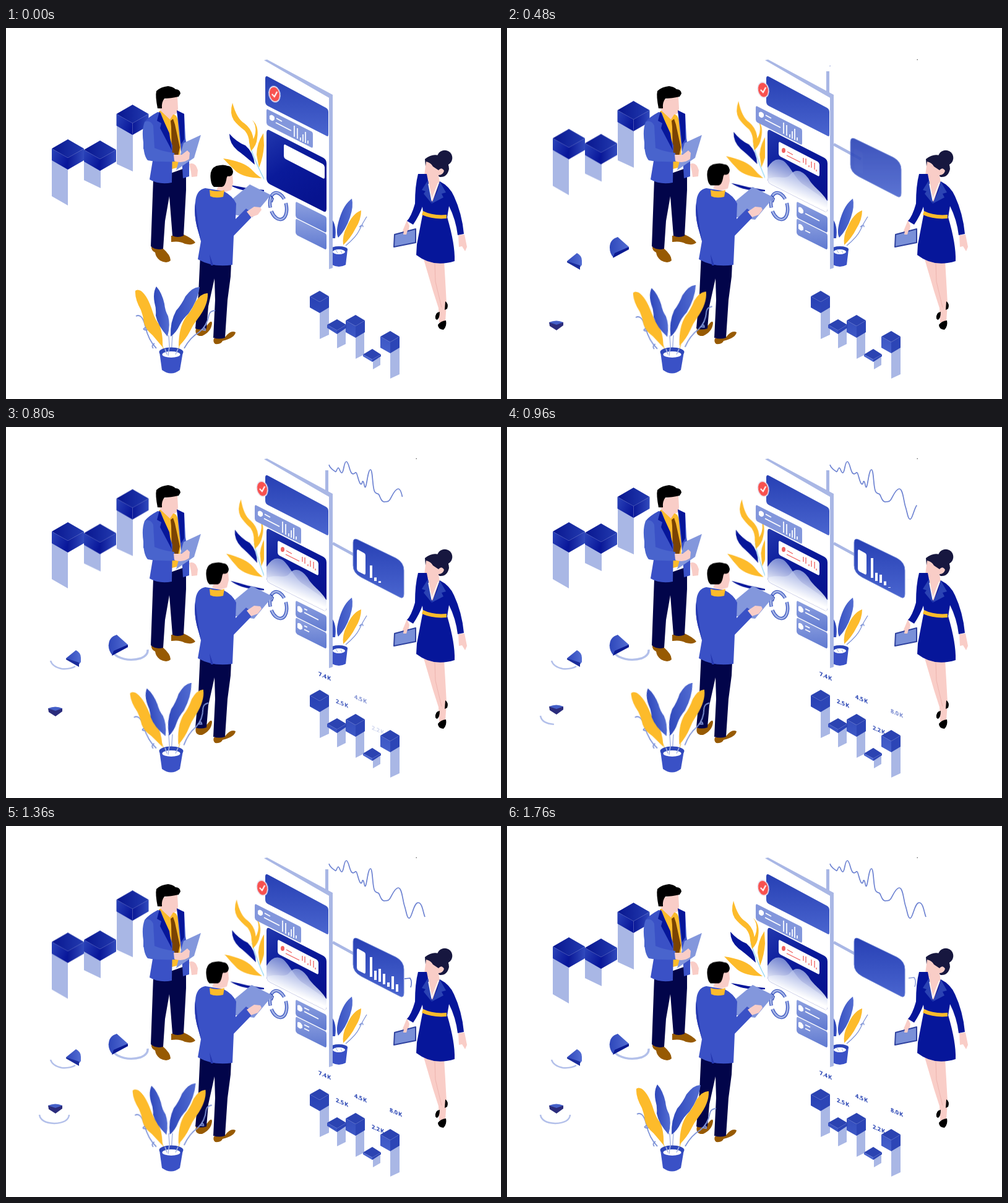
Animation of 800x600 px, one loop 1840 ms. Source, as an HTML page without scripts:

```html
<!DOCTYPE html>
<html lang="en">
<head>
<meta charset="utf-8">
<title>Isometric team dashboard</title>
<style>
html,body{margin:0;width:100%;height:100%;overflow:hidden;background:#fff}
svg{display:block;width:100%;height:100%}
.a{animation:1.84s linear infinite}
.blue{fill:#3a51c6}.navy{fill:#06169a}.night{fill:#02054a}.gold{fill:#fdbb2b}
.skin{fill:#f9cdc7}.pale{fill:#a9b7e5}.mid{fill:#8397dc}.shoe{fill:#975a02}
.w{fill:none;stroke:#fff;stroke-width:1.7}
.r{fill:none;stroke:#f0605f;stroke-width:1.3}
.vine{fill:none;stroke:#7f94d8;stroke-width:1.8}
.arc{fill:none;stroke:#b3c0ea;stroke-width:3.4;stroke-dasharray:1 2}
.label{font:bold 9.2px "Open Sans","Noto Sans",sans-serif;word-spacing:-1.5px;fill:#2440b2}
.draw{stroke-dasharray:1 2}

/* bobbing cubes */
.c1{animation-name:c1}.c2{animation-name:c2}.c3{animation-name:c3}
.c1,.c2,.c3{animation-timing-function:ease-in-out}
@keyframes c1{0%,4.3%{transform:none}41.7%,52.2%{transform:translateY(-26px)}87%,100%{transform:none}}
@keyframes c2{0%,8.7%{transform:none}47.8%,56.5%{transform:translateY(-26px)}91.3%,100%{transform:none}}
@keyframes c3{0%,13%{transform:none}52.2%,63%{transform:translateY(-26px)}95.6%,100%{transform:none}}

/* swaying leaves */
.sway{animation-name:sway;transform-origin:266px 520px}
.bush{animation-name:sway;transform-origin:417px 262px}
@keyframes sway{0%,95.65%,100%{transform:none}47.8%{transform:rotate(var(--d))}}

/* panel */
.row{animation-name:row}
@keyframes row{0%{transform:none}13.04%{transform:translate(-16px,-4px)}21.7%,100%{transform:translate(-19px,-5px)}}
.badge{animation-name:badge}
@keyframes badge{0%{transform:none}13.04%{transform:translate(-16px,-5px)}21.7%,100%{transform:translate(-20px,-7px)}}
.slot{animation-name:slot}
@keyframes slot{0%,6%{transform:none}13.04%{transform:translate(-3.5px,-1.5px)}26.08%,100%{transform:translate(-10px,-4px)}}
.hills{animation-name:hills;transform-origin:421px 250px}
@keyframes hills{0%{transform:scaleX(.4);opacity:0}4.3%{opacity:0}13.04%{transform:scaleX(.86);opacity:1}21.7%,100%{transform:none;opacity:1}}
.in1{animation-name:in1}.in2{animation-name:in2}.in3{animation-name:in3}
@keyframes in1{0%,4.3%{opacity:0}13%,100%{opacity:1}}
@keyframes in2{0%,14%{opacity:0}25%,100%{opacity:1}}
@keyframes in3{0%,26%{opacity:0}34%,78%{opacity:1}91%,100%{opacity:0}}
.d1{animation-name:d1}.d2{animation-name:d2}.d3{animation-name:d3}.d4{animation-name:d4}.d5{animation-name:d5}
@keyframes d1{0%,8.7%{stroke-dashoffset:1}17.4%,100%{stroke-dashoffset:0}}
@keyframes d2{0%,15%{stroke-dashoffset:1}26%,100%{stroke-dashoffset:0}}
@keyframes d3{0%,26.1%{stroke-dashoffset:1}43.47%{stroke-dashoffset:.27}56.5%,100%{stroke-dashoffset:0}}
@keyframes d4{0%,28%{stroke-dashoffset:1}43%,100%{stroke-dashoffset:0}}
@keyframes d5{0%,45%{stroke-dashoffset:1}60.5%,100%{stroke-dashoffset:0}}

/* card, pies, head */
.card{animation-name:card}
@keyframes card{0%,20%{opacity:0;transform:translate(-12px,-6px)}26.08%{opacity:.9;transform:translate(-6px,-3px)}34.8%,100%{opacity:1;transform:none}}
.hook{animation-name:hook}
@keyframes hook{0%,52%{opacity:0;transform:none}60%,82%{opacity:1;transform:none}95.6%,100%{opacity:.7;transform:translate(5px,-1px)}}
.dot{animation-name:dot}
@keyframes dot{0%,24%{opacity:0}24.1%,100%{opacity:1}}
.p1{animation-name:p1}.p2{animation-name:p2}.p3{animation-name:p3}
@keyframes p1{0%,3%{opacity:0;transform:translateY(30px)}8%{opacity:1}13.04%{transform:translateY(18px)}26.08%{transform:translateY(2px)}34.8%,100%{opacity:1;transform:none}}
@keyframes p2{0%,7%{opacity:0;transform:translateY(50px)}12%{opacity:1}13.04%{transform:translateY(37px)}26.08%{transform:translateY(3px)}34.8%,100%{opacity:1;transform:none}}
@keyframes p3{0%,18%{opacity:0;transform:translateY(36px)}24%{opacity:1}26.08%{transform:translateY(24px)}43.47%{transform:translateY(3px)}52%,100%{opacity:1;transform:none}}
.head{animation-name:head}
@keyframes head{0%{transform:none}13.04%{transform:translate(-3px,-1px)}26.08%,100%{transform:translate(-7px,-2.5px)}}
.pad{animation-name:pad}
@keyframes pad{0%{transform:none}13.04%{transform:translate(1.5px,2px)}26.08%,100%{transform:translate(3px,4px)}}
</style>
</head>
<body>
<svg viewBox="0 0 800 600">
<defs>
  <linearGradient id="top"><stop stop-color="#08168f"/><stop offset="1" stop-color="#233bb0"/></linearGradient>
  <linearGradient id="left" x2="1" y2=".6"><stop stop-color="#2c45ba"/><stop offset="1" stop-color="#08169a"/></linearGradient>
  <linearGradient id="right"><stop stop-color="#0a1897"/><stop offset="1" stop-color="#324bbd"/></linearGradient>
  <linearGradient id="pane" x2="0" y2="1"><stop stop-color="#2740b4"/><stop offset="1" stop-color="#4a65cf"/></linearGradient>
  <linearGradient id="deep" x2=".5" y2="1"><stop stop-color="#2238ae"/><stop offset=".5" stop-color="#0a1a9a"/><stop offset="1" stop-color="#07138f"/></linearGradient>
  <linearGradient id="soft" x2="0" y2="1"><stop stop-color="#8ea1e0"/><stop offset="1" stop-color="#5f79d0"/></linearGradient>
  <linearGradient id="leaf"><stop stop-color="#2e47bb"/><stop offset="1" stop-color="#536dd2"/></linearGradient>
  <linearGradient id="haze" gradientUnits="userSpaceOnUse" x1="470" y1="222" x2="452" y2="266"><stop stop-color="#8fa1df" stop-opacity=".75"/><stop offset="1" stop-color="#fff"/></linearGradient>
  <clipPath id="screen"><path id="main" d="M421 170Q421 162 427 166L513 210Q518 213 518 219V292Q518 300 512 296L427 253Q421 250 421 243Z"/></clipPath>
  <clipPath id="edge"><path d="M340 100H417.5V280H340Z"/></clipPath>
  <g id="block">
    <path d="M0 0L26 15 0 30-26 15Z" fill="url(#top)"/>
    <path d="M-26 15L0 30V49L-26 34Z" fill="url(#left)"/>
    <path d="M26 15L0 30V49L26 34Z" fill="url(#right)"/>
  </g>
  <g id="lines">
    <path d="M471 290Q475 288 479 295V299Q475 302 471 297Z" fill="#fff"/>
    <path class="w a draw d1" pathLength="1" d="M482 294L490 298"/>
  </g>
  <path id="tag" d="M468 284Q468 280 471 282L515 304Q518 305 518 309V327Q518 332 515 330L471 308Q468 306 468 303Z"/>
</defs>

<!-- bobbing cubes -->
<g class="a c1"><path class="pale" d="M74 212L100 226V287L74 272Z"/><use href="#block" x="100" y="180"/></g>
<g class="a c2"><path class="pale" d="M126 213L153 228V259L126 246Z"/><use href="#block" x="152" y="182"/></g>
<g class="a c3"><path class="pale" d="M179 156L205 170V232L179 220Z"/><use href="#block" x="204.500" y="124"/></g>

<!-- pies -->
<path class="arc a d4" pathLength="1" d="M167 352Q166 362 180 371Q198 380 218 374Q230 369 229 360"/>
<path class="arc a d4" style="stroke-width:2.5" pathLength="1" d="M72 378Q75 388 90 391Q104 392 112 387"/>
<path class="arc a d5" style="stroke-width:2.5" pathLength="1" d="M54 467Q56 480 78 481Q101 480 102 467"/>
<g class="a p1"><path fill="url(#leaf)" d="M197 352L179 336Q166 340 166 353Q166 363 172 369Z"/><path fill="#0b1a92" d="M197 352L174 362 171 370 197 356Z"/></g>
<g class="a p2"><path fill="url(#leaf)" d="M97 374L113 361Q121 365 121 373V380L118 384Z"/><path fill="#1a2c9c" d="M97 374L118 381V388L97 376Z"/></g>
<g class="a p3"><path fill="#2b2c7c" d="M68 452H91V457L80 465 69 458Z"/><path fill="#4560c8" d="M68 452Q80 447 91 452L80 456Z"/></g>

<!-- plant beside the panel -->
<g clip-path="url(#edge)"><g class="a bush" style="--d:6deg">
  <path d="M394 190Q404 220 419 248" fill="none" stroke="#94d7f3" stroke-width="1.300"/>
  <path class="gold" d="M366 121Q361 138 368 149Q374 157 386 166Q393 175 393 185L396 199Q402 186 399 175Q396 162 385 154Q373 147 366 121ZM398 149Q405 157 403 170Q401 180 395 187L396 199Q405 190 406 178Q409 158 398 149ZM416 170Q405 187 405 205L409 226Q416 208 417 190ZM351 211Q361 222 372 232Q384 242 413 243Q403 236 396 228Q384 216 351 211Z"/>
  <path class="navy" d="M361 171Q361 187 374 198Q384 205 402 221Q400 201 387 190Q372 184 361 171ZM362 254Q376 256 390 259L418 262V264Q380 266 362 254Z"/>
</g></g>

<!-- plant behind the panel -->
<path fill="url(#leaf)" d="M559 276Q546 285 539 308Q532 330 537 339Q549 327 556 306Q562 288 559 276ZM526 308Q535 320 532 340H526Z"/>
<path class="gold" d="M574 295Q560 300 551 321Q543 336 545 351Q557 340 565 324Q574 310 574 295Z"/>
<path class="vine" style="stroke-width:1.300" d="M549 352Q566 338 571 327T583 305M571 322Q577 316 577 322"/>
<path class="blue" d="M523 358L527 383Q538 389 549 383L552 358Z"/><ellipse cx="538" cy="358" rx="14" ry="5" fill="#2c45b8"/><ellipse cx="538" cy="362" rx="10" ry="4" fill="#fff"/>
<path d="M533 359L536 364M541 360L543 364" stroke="#9fb0e4"/>

<!-- panel -->
<path class="pale" d="M417 52L422 51 528 108V388L522 390V113Z"/><path fill="#fff" d="M417 55L522 113V390H417Z"/>
<path d="M518.500 107V70" class="a draw d2" pathLength="1" stroke="#a9b7e5" stroke-width="5"/>
<path d="M528 188L572 212" class="a draw d2" pathLength="1" stroke="#a9b7e5" stroke-width="4.500"/>
<path fill="url(#pane)" d="M419 82Q419 76 424 79L517 129Q521 131 521 136V172Q521 177 517 174L423 126Q419 124 419 119Z"/>
<use href="#main" fill="url(#deep)"/>
<g clip-path="url(#screen)"><g class="a hills" fill="url(#haze)">
  <path d="M421 226Q432 208 445 214C457 220 466 246 482 255L518 280V300H421Z"/>
  <path d="M421 244C440 237 450 247 458 237C467 226 478 231 487 243C496 259 506 261 518 280V300H421Z"/>
</g></g>
<g class="a slot">
  <path fill="#fff" d="M449 191Q449 187 452 189L512 220Q515 222 515 225V241Q515 245 512 243L452 212Q449 210 449 207Z"/>
  <g class="a in2">
    <ellipse cx="457" cy="202" rx="3" ry="4" fill="#f0605f"/>
    <path class="r" d="M463 204L472 209M462 210L484 221M489 222V214M493 225V215M498 229V226M502 230V220M507 233V222M510 236V233"/>
  </g>
</g>
<g class="a row">
  <path class="mid" d="M421 134Q421 130 424 132L493 167Q496 168 496 172V191Q496 195 493 193L424 158Q421 156 421 153Z"/>
  <path fill="#fff" d="M426 142Q430 138 434 144V148Q430 153 426 147Z"/>
  <path class="w" d="M437 146L446 151M436 153L461 166M466 176V158M471 179V162M476 182V177M480 184V172M484 186V168M488 187V182"/>
</g>
<g class="a badge"><g transform="translate(434 107) rotate(-12)">
  <ellipse rx="9.500" ry="13.500" fill="#e9ecfa"/><ellipse rx="8" ry="11.500" fill="#f8514f"/><path class="w" style="stroke-width:2" d="M-4-1L-1 4 5-3"/>
</g></g>
<use href="#tag" fill="url(#soft)"/><use href="#tag" y="27.500" fill="url(#soft)"/>
<g class="a in1"><use href="#lines"/><use href="#lines" y="27.500"/>
  <path class="w a draw d1" pathLength="1" d="M482 300L505 312"/>
  <path class="w a draw d1" pathLength="1" d="M482 327.500L490 331.500"/>
</g>
<g fill="none" stroke-dasharray="50 6 46 7" transform="rotate(-13 440 288)">
  <ellipse cx="440" cy="288" rx="13" ry="22" stroke="#3550bd" stroke-width="5.400"/>
  <ellipse cx="440" cy="288" rx="13" ry="22" stroke="#a3b3e6" stroke-width="3"/>
</g>
<path d="M428 271L432 276 430 282" fill="none" stroke="#2440b0" stroke-width="1.500"/>

<!-- line chart -->
<path class="a draw d3" pathLength="1" fill="none" stroke="#6f84d2" stroke-width="1.700" d="M522 61C524 68 530 70 532 72S535 66 537 66S540 75 543 74S546 56 550 56S555 72 559 75S564 72 566 74S570 90 573 92S575 87 577 88S579 99 581 97S585 69 589 69S592 100 596 105S601 106 603 110S607 122 612 121S617 122 620 118S628 100 634 100S641 120 644 129S648 150 652 149S659 124 666 124S674 140 677 147"/>
<path class="a dot" d="M662.500 50.500H664V52H662.500Z" fill="#777"/>

<!-- card -->
<g class="a card">
  <path fill="url(#pane)" stroke="#7288d6" d="M561 187Q561 179 568 182L630 212Q643 219 643 232V270Q643 279 636 275L574 243Q561 236 561 224Z"/>
  <g class="a in3">
    <path fill="#fff" d="M567 201Q567 197 570 199L579 204Q581 205 581 208V236Q581 240 578 238L570 234Q567 232 567 229Z"/>
    <g class="w draw" style="stroke-width:4">
      <path pathLength="1" d="M590 244V212"><animate attributeName="stroke-dashoffset" values="1;1;0;0" keyTimes="0;.326;.5;1" dur="1.840s" repeatCount="indefinite"/></path>
      <path pathLength="1" d="M597 249V234"><animate attributeName="stroke-dashoffset" values="1;1;0;0" keyTimes="0;.37;.543;1" dur="1.840s" repeatCount="indefinite"/></path>
      <path pathLength="1" d="M604 252V231"><animate attributeName="stroke-dashoffset" values="1;1;0;0" keyTimes="0;.413;.587;1" dur="1.840s" repeatCount="indefinite"/></path>
      <path pathLength="1" d="M611 256V239"><animate attributeName="stroke-dashoffset" values="1;1;0;0" keyTimes="0;.457;.63;1" dur="1.840s" repeatCount="indefinite"/></path>
      <path pathLength="1" d="M618 260V253"><animate attributeName="stroke-dashoffset" values="1;1;0;0" keyTimes="0;.5;.674;1" dur="1.840s" repeatCount="indefinite"/></path>
      <path pathLength="1" d="M625 264V243"><animate attributeName="stroke-dashoffset" values="1;1;0;0" keyTimes="0;.57;.74;1" dur="1.840s" repeatCount="indefinite"/></path>
      <path pathLength="1" d="M632 268V256"><animate attributeName="stroke-dashoffset" values="1;1;0;0" keyTimes="0;.55;.74;1" dur="1.840s" repeatCount="indefinite"/></path>
    </g>
  </g>
</g>
<path class="a hook" d="M644 247L653 246Q657 252 654 261" fill="none" stroke="#5a72cb" stroke-width="1.500"/>

<!-- small columns -->
<path class="pale" d="M507 455L522 448V496L507 503ZM535 490L549 483V511L535 518ZM565 495L579 488V528L565 535ZM593 538L605 532V545L593 552ZM621 520L636 513V560L621 567Z"/>
<path fill="#2b43b2" d="M507 425L522 434 507 443 491 434ZM535 471L550 480 535 489 519 480ZM565 464L580 473 565 482 549 473ZM592 519L606 528 592 536 577 528ZM621 490L636 499 621 508 605 499Z"/>
<path fill="url(#pane)" d="M491 434L507 443V461L491 452ZM519 480L535 489V495L519 485ZM549 473L565 482V501L549 492ZM577 528L592 536V540L577 531ZM605 499L621 508V526L605 517Z"/>
<path fill="#2c45b6" d="M522 434L507 443V461L522 452ZM550 480L535 489V495L550 485ZM580 473L565 482V501L580 492ZM606 528L592 536V540L606 531ZM636 499L621 508V526L636 517Z"/>
<g class="label">
  <text transform="translate(505 402) skewY(23)">7.4 K<animate attributeName="opacity" values="0;0;1;1" keyTimes="0;.3;.42;1" dur="1.840s" repeatCount="indefinite"/></text>
  <text transform="translate(533 446) skewY(23)">2.5 K<animate attributeName="opacity" values="0;0;1;1" keyTimes="0;.34;.45;1" dur="1.840s" repeatCount="indefinite"/></text>
  <text transform="translate(563 439) skewY(23)">4.5 K<animate attributeName="opacity" values="0;0;1;1" keyTimes="0;.37;.48;1" dur="1.840s" repeatCount="indefinite"/></text>
  <text transform="translate(591 489) skewY(23)">2.2 K<animate attributeName="opacity" values="0;0;1;1" keyTimes="0;.41;.53;1" dur="1.840s" repeatCount="indefinite"/></text>
  <text transform="translate(620 462) skewY(23)">8.0 K<animate attributeName="opacity" values="0;0;1;1" keyTimes="0;.44;.57;1" dur="1.840s" repeatCount="indefinite"/></text>
</g>

<!-- man facing the panel -->
<path class="shoe" d="M235 352L253 356Q266 367 266 376Q260 382 249 376Q242 371 241 363Q234 360 235 352ZM267 336L287 334Q301 340 306 347Q301 352 289 349Q281 344 267 346Z"/>
<path class="night" d="M238 245L291 226 291 262 287 336Q277 340 269 336L264 272 257 312 254 357Q242 360 234 353Z"/>
<path class="gold" d="M247 135L256 130 275 142 284 160 280 225 268 228Z"/>
<path fill="#7a4303" d="M266 150L270 147 273 156 281 193 278 207 268 203 267 160Z"/>
<path class="skin" d="M252 116Q264 112 277 111L278 130Q277 140 270 140L265 148 250 134 247 128Z"/>
<path d="M245 130Q241 110 243 102Q250 95 262 94Q270 95 274 99Q281 99 282 106L279 111Q266 114 256 114Q251 120 252 130Z"/>
<path class="blue" d="M245 136Q230 144 224 152L222 195 237 215 232 245Q248 254 268 250L269 190 250 137ZM276 134L288 139 290 178 296 215V240L286 243 284 210Z"/>
<path class="navy" d="M248 135L244 150 251 154 249 162 268 198 264 170ZM276 133L288 139 288 180 283 188 280 160Z"/>
<path fill="#4964cd" d="M224 152Q233 148 238 158L240 194Q254 200 272 202L273 216Q245 217 229 214Q222 206 222 185Q219 165 224 152Z"/>
<path class="skin" d="M296 220Q306 216 310 230L309 240 300 241 299 233Z"/>
<path class="mid" d="M287 186L315 173 304 210 275 230Z"/>
<path class="skin" d="M271 205L284 205 293 198 297 202 296 212Q285 220 272 215Z"/>

<!-- man with his back turned -->
<path class="shoe" d="M307 486L325 481Q332 471 333 477Q332 491 317 498Q304 499 307 486ZM336 502L354 500Q363 488 371 492Q370 501 350 506Q348 512 338 511Q334 508 336 502Z"/>
<path class="night" d="M314 366Q340 384 364 380L363 402 358 440 354 501Q344 504 335 501L338 440 337 405 327 450 324 486Q314 489 306 486L311 430Z"/>
<g class="a head">
  <path class="skin" d="M353 238L366 236 367 250 364 262 352 266 340 262Z"/>
  <path d="M331 246Q328 228 340 223Q352 220 358 223Q365 223 367 232Q367 239 360 240Q357 238 356 246Q354 256 349 257H336Q332 254 331 246Z"/>
</g>
<path class="mid a pad" d="M365 277L394 253 428 270 398 306 368 302Z"/>
<path class="blue" d="M322 259Q307 262 306 282Q303 305 311 330L315 345 310 374Q335 388 366 383L368 336 396 307Q398 298 388 292L371 309 372 284Q367 272 352 264Z"/>
<path fill="#2538b0" d="M306 282Q303 305 311 330L315 344 311 320ZM329 366L331 384 335 384Z"/>
<path class="gold" d="M329 262Q342 266 353 262L351 273Q338 276 330 272Z"/>
<path class="skin" d="M389 297L401 289 411 290 413 294 407 302 396 306Z"/>

<!-- front plant -->
<g class="a sway" style="--d:-4deg"><path class="vine" d="M210 466Q220 461 225 482Q230 505 243 518M222 487Q230 480 231 487Q226 490 222 487M240 510Q234 514 238 518"/></g>
<g class="a sway" style="--d:-10deg"><path class="vine" d="M288 518Q298 500 312 492Q325 482 328 464Q330 457 338 457M316 488Q322 482 322 489Z"/></g>
<path class="vine" style="stroke:#f8d88a" d="M252 512L258 528M281 512L276 528"/><path class="vine" style="stroke:#b4c0e8" d="M263 497L265 528M269 497L267 528"/>
<path class="gold a sway" style="--d:-5.800deg" d="M209 425Q208 438 218 456Q222 466 223 477Q226 488 237 497L253 516Q254 495 248 480Q241 472 237 459Q229 433 218 425Q212 422 209 425Z"/>
<path fill="url(#leaf)" class="a sway" style="--d:-9.700deg" d="M243 418Q237 428 240 444Q243 454 242 465Q245 481 261 499Q266 481 262 466Q257 457 256 446Q252 428 243 418Z"/>
<path fill="url(#leaf)" class="a sway" style="--d:-8deg" d="M313 419Q302 418 290 434Q284 447 275 457Q265 475 266 499Q275 493 281 480Q286 470 295 462Q310 441 313 419Z"/>
<path class="gold a sway" style="--d:-4.800deg" d="M326 429Q316 428 306 443Q300 457 291 467Q279 484 279 515Q291 503 297 491Q302 480 310 470Q327 448 326 429Z"/>
<path class="blue" d="M248 524L252 553Q267 564 281 553L286 524Z"/><ellipse cx="267" cy="524" rx="19.500" ry="7.500" fill="#2f48ba"/><ellipse cx="267" cy="528" rx="14.500" ry="5" fill="#fff"/>
<path d="M257 519L260 528M264 516L262 530M278 519L274 528" stroke="#a9b7e5" stroke-width="1.500"/>

<!-- woman -->
<path class="skin" d="M675 374L708 376 710 410 712 446 710 475 700 476 699 453 690 425Z"/>
<path d="M693 381L694 410 704 452" fill="none" stroke="#e8aaa4" stroke-width=".7"/>
<path d="M694 470Q693 460 701 459Q701 471 696 472ZM698 480Q702 474 711 473Q713 482 707 488Q698 487 698 480ZM710 442Q716 446 713 454L709 456Z"/>
<circle cx="709" cy="210" r="12.300" fill="#17173f"/>
<path fill="#17173f" d="M677 212Q688 203 699 206Q715 210 716 228Q713 242 701 241L678 224Z"/>
<path class="skin" d="M679 216Q687 218 690 224L699 230Q704 224 708 231Q706 238 699 238L701 250 689 284 681 250 683 245Q677 244 676 238Z"/>
<path class="skin" d="M648 311L652 320 649 335 643 336 641 328ZM731 335L741 334 745 354 742 361 737 353 732 354Z"/>
<path class="navy" d="M680 236L666 236Q661 255 661 284Q655 305 648 312L658 318Q668 303 673 289L674 298 664 350 663 367Q690 388 725 377Q726 350 713 306L716 288Q727 310 730 335L740 333Q737 300 724 272Q717 256 701 248L689 282Z"/>
<path fill="#2b43b4" d="M682 246L672 262 678 264 675 268 688 284ZM701 248L711 266 704 268 707 274 688 284 697 264Z"/>
<path d="M683 252L688 278 699 250" fill="none" stroke="#fff" stroke-width="1.500"/>
<path class="gold" d="M674 296Q690 304 712 302V308Q690 310 672 302Z"/>
<path d="M628 334L662 325V347L627 354Z" fill="#7a90d8" stroke="#2f429f" stroke-width="2" stroke-linejoin="round"/>
<path class="skin" d="M643 328L648 320 650 324 647 334 642 334Z"/>
</svg>
</body>
</html>
```
